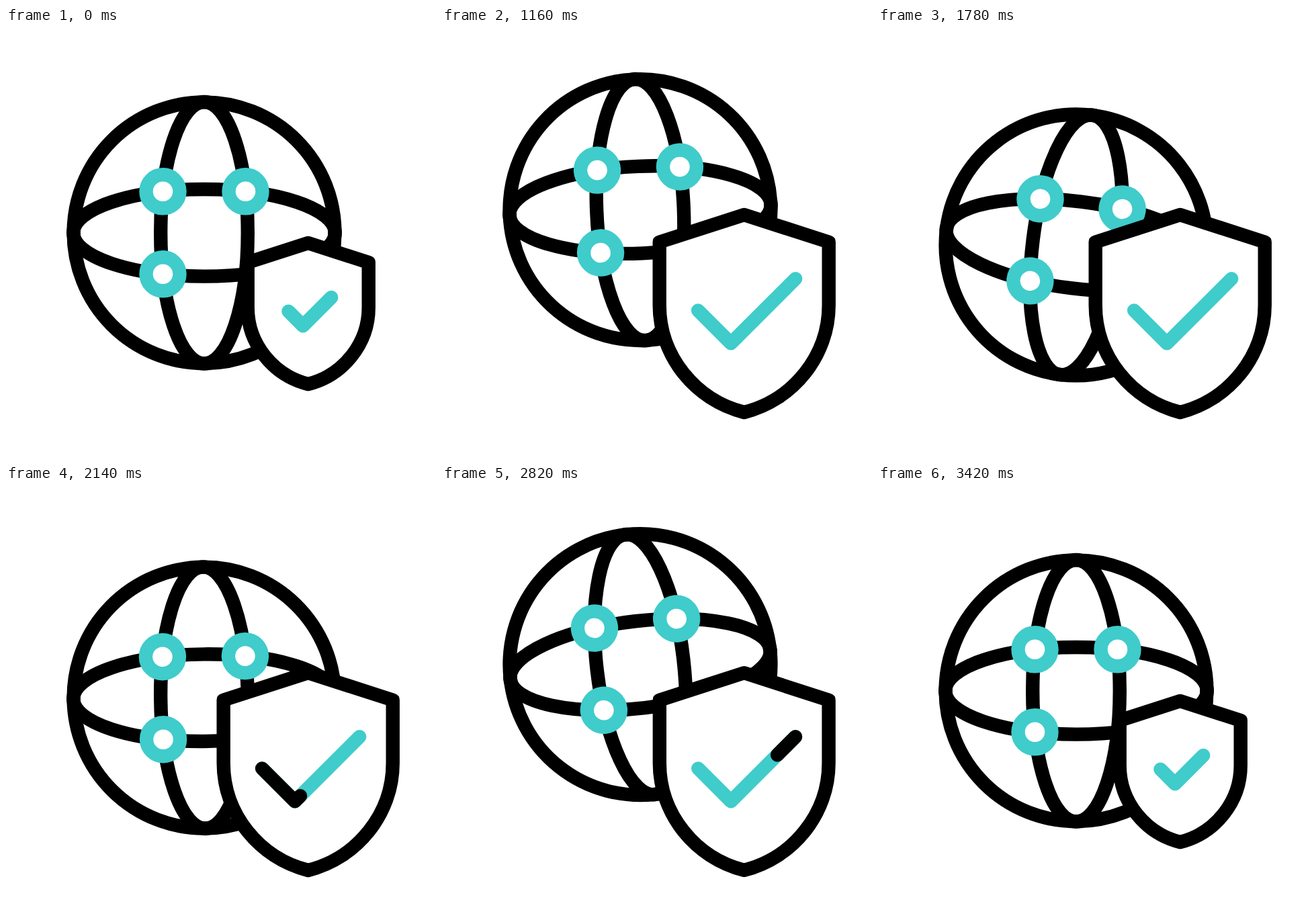
These frames come from a looping animation (640 px wide and 640 px high, 3.6 s). An HTML page:

```html
<!DOCTYPE html>
<html lang="en">
<head>
<meta charset="utf-8">
<title>Secure network</title>
<style>
  html, body { margin: 0; width: 100%; height: 100%; overflow: hidden; background: #fff; }
  svg { display: block; width: 100%; height: 100%; }
  svg * { stroke-width: 20.4; stroke-linecap: round; stroke-linejoin: round; }
  .ink { fill: none; stroke: #000; }
  .accent { fill: none; stroke: #3fcccb; }
  .filled { fill: #fff; }
</style>
</head>
<body>
<svg viewBox="0 0 640 640">
  <g id="globe">
    <circle class="ink" r="194.4"/>
    <ellipse class="ink" rx="194.8" ry="64.8"/>
    <ellipse class="ink" rx="64.8" ry="194.8"/>
    <circle class="accent filled" cx="-61.5" cy="-61.5" r="25"/>
    <circle class="accent filled" cx="61.5" cy="-61.5" r="25"/>
    <circle class="accent filled" cx="-61.5" cy="61.5" r="25"/>
  </g>
  <path id="shield" class="ink filled"/>
  <path id="check" class="accent"/>
  <path id="sweep" class="ink" pathLength="1"/>
</svg>
<script>
const LOOP = 3600;
const [globe, shield, check, sweep] =
  ["globe", "shield", "check", "sweep"].map(id => document.getElementById(id));

// Each track is a list of [time, value] keys, eased in and out between keys.
const tracks = {
  globeY: [[200, 304.8], [1000, 265.5], [1900, 325.8], [2800, 265.5], [3400, 304.8]],
  tilt: [[200, 0], [840, -8], [1640, 8], [2600, -8], [3400, 0]],
  grow: [[200, 0], [1000, 1], [2800, 1], [3400, 0]],
  sweepEnd: [[1880, 0], [2490, 1]],
  sweepStart: [[2430, 0], [2970, 1]]
};

const smooth = s => s * s * (3 - 2 * s);
const mix = (a, b, k) => a + (b - a) * k;

function valueAt(track, t) {
  if (t <= track[0][0]) return track[0][1];
  for (let i = 1; i < track.length; i++) {
    const [t0, v0] = track[i - 1], [t1, v1] = track[i];
    if (t < t1) return mix(v0, v1, smooth((t - t0) / (t1 - t0)));
  }
  return track[track.length - 1][1];
}

function shieldPath(scale) {
  const p = (x, y) => `${449.7 + x * scale},${425 + y * scale} `;
  return "M" + p(0, -105) + "L" + p(90, -76) + "L" + p(90, -9) +
    "C" + p(90, 45) + p(52, 92) + p(0, 105) +
    "C" + p(-52, 92) + p(-90, 45) + p(-90, -9) + "L" + p(-90, -76) + "Z";
}

const smallCheck = [[420.4, 421.6], [442, 443.2], [484.2, 401]];
const largeCheck = [[381.1, 420.4], [430, 469.3], [526.2, 373.1]];

function checkPath(k) {
  return "M" + smallCheck.map(([x, y], i) =>
    `${mix(x, largeCheck[i][0], k)},${mix(y, largeCheck[i][1], k)}`).join("L");
}

function draw(t) {
  const at = name => valueAt(tracks[name], t);
  globe.setAttribute("transform", `translate(295 ${at("globeY")}) rotate(${at("tilt")})`);

  const grow = at("grow");
  shield.setAttribute("d", shieldPath(mix(1, 1.4, grow)));
  const d = checkPath(grow);
  check.setAttribute("d", d);
  sweep.setAttribute("d", d);

  const start = at("sweepStart"), length = at("sweepEnd") - start;
  sweep.style.display = length > 0 ? "" : "none";
  sweep.setAttribute("stroke-dasharray", `${length} 3`);
  sweep.setAttribute("stroke-dashoffset", -start);
}

const begin = performance.now();
function tick() {
  draw((performance.now() - begin) % LOOP);
  requestAnimationFrame(tick);
}
tick();
</script>
</body>
</html>
```
